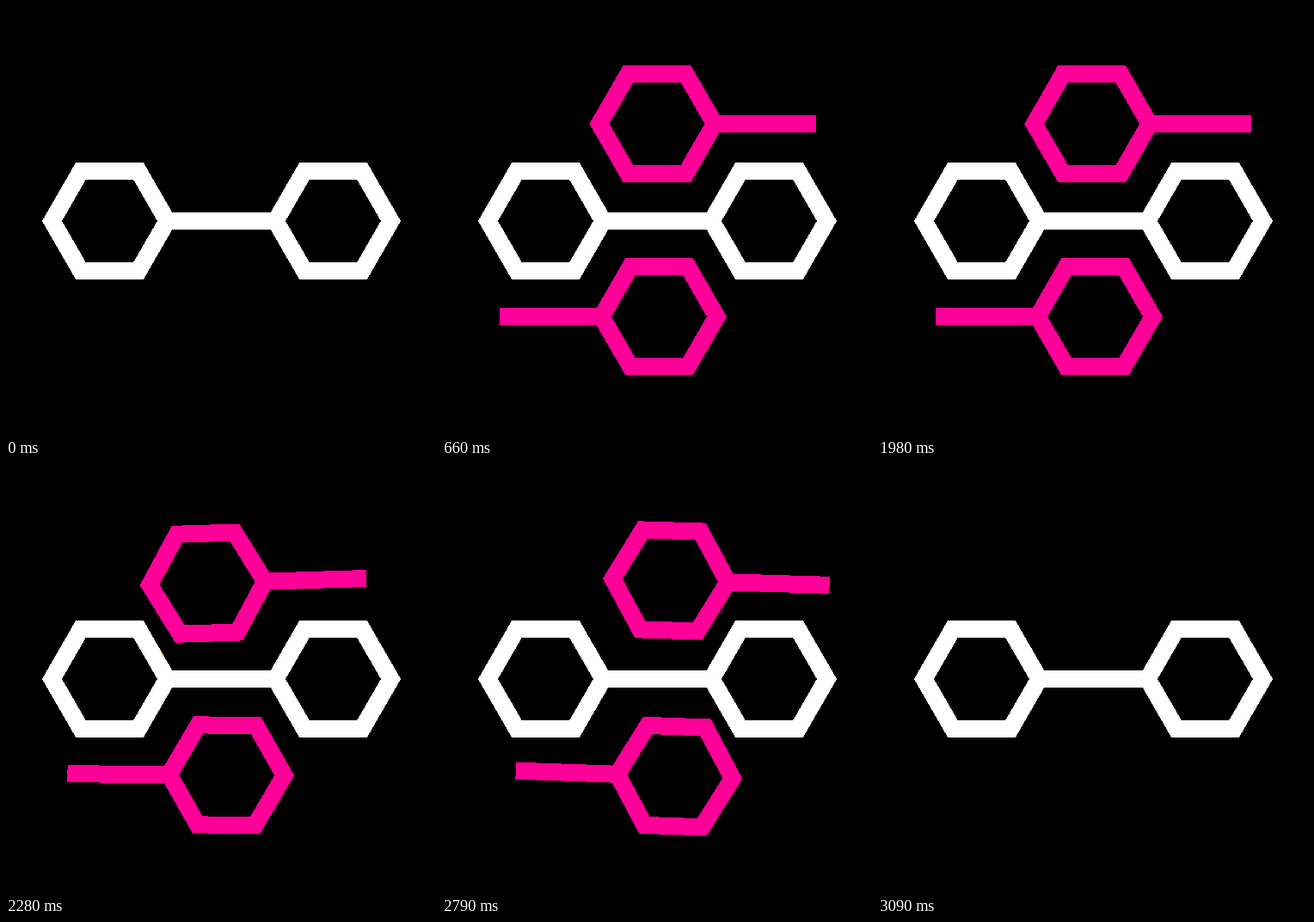
An HTML page for the animation above (3180 ms loop, 500 px wide and 500 px high).

```html
<!DOCTYPE html>
<html lang="en">
<head>
<meta charset="utf-8">
<title>Hexagons</title>
<style>
  html, body { margin: 0; width: 100%; height: 100%; overflow: hidden; background: #000; }
  svg { display: block; width: 100vw; height: 100vh; }
</style>
</head>
<body>
<svg viewBox="0 0 500 500" fill="none" stroke-width="20" shape-rendering="crispEdges">
  <defs>
    <path id="hexagon" d="M67 0L33.5 58H-33.5L-67 0L-33.5-58H33.5Z"/>
    <g id="key">
      <use href="#hexagon" x="-53.5"/>
      <path d="M13.5 0H131.7"/>
    </g>
  </defs>
  <g stroke="#f09">
    <use id="upper" href="#key"/>
    <use id="lower" href="#key"/>
  </g>
  <g stroke="#fff">
    <use href="#hexagon" x="120.5" y="250"/>
    <use href="#hexagon" x="380.5" y="250"/>
    <path d="M187 250H314"/>
  </g>
</svg>
<script>
const LOOP = 3180, STEP = 30;
const SHOW = 60, LEAVE = 1530, HIDE = 3090;
const PIXELS_PER_DEGREE = 9.2;

// Each piece swings in past its rest place, and later leans back before leaving.
// turn: ms of the far point of the swing, peak: px there, edge: px when cut off.
const pieces = [
  { node: document.getElementById('upper'), x: 303.5, y: 137, angle: 0, rest: 270,
    enter: { turn: 135, peak: -35, edge: 70, power: 1 },
    leave: { turn: 2580, peak: -44, edge: 213, power: 2.67 } },
  { node: document.getElementById('lower'), x: 199, y: 361.25, angle: 180, rest: 660,
    enter: { turn: 270, peak: 41, edge: -260, power: 1.5 },
    leave: { turn: 2655, peak: 41, edge: -115, power: 4 } }
];

const smooth = u => u * u * (3 - 2 * u);

// Offset on the way from rest (0) over the peak to the edge; works in both time directions.
function swing(time, rest, end, { turn, peak, edge, power }) {
  const lean = (time - rest) / (turn - rest);
  if (lean <= 1) return peak * smooth(Math.max(0, lean) ** power);
  return peak + (edge - peak) * ((time - turn) / (end - turn)) ** 1.65;
}

function draw(now) {
  const time = Math.floor((now % LOOP) / STEP) * STEP;
  const visible = time >= SHOW && time < HIDE;
  for (const { node, x, y, angle, rest, enter, leave } of pieces) {
    node.setAttribute('visibility', visible ? 'visible' : 'hidden');
    if (!visible) continue;
    const offset = time < LEAVE
      ? swing(time, rest, SHOW, enter)
      : swing(time, LEAVE, HIDE, leave);
    node.setAttribute('transform',
      `translate(${x + offset} ${y}) rotate(${angle + offset / PIXELS_PER_DEGREE})`);
  }
}

const start = performance.now();
function tick() {
  draw(performance.now() - start);
  requestAnimationFrame(tick);
}
tick();
</script>
</body>
</html>
```
